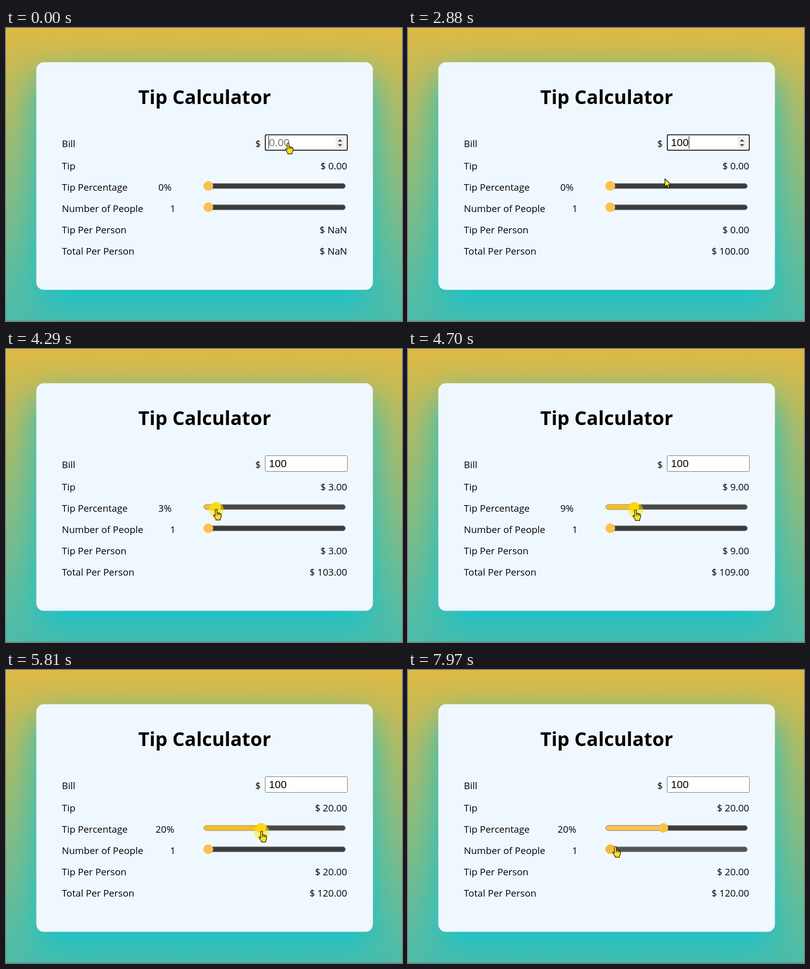
These frames come from a looping animation (780 px wide and 578 px high, 8000 ms). An HTML page with a canvas:

```html
<!DOCTYPE html>
<html lang="en">
<head>
<meta charset="utf-8">
<title>Tip Calculator</title>
<style>
html, body { margin: 0; width: 100%; height: 100%; overflow: hidden; background: #4cbcaa; }
canvas { display: block; }
</style>
</head>
<body>
<canvas id="stage" width="780" height="578"></canvas>
<script>
const g = document.getElementById('stage').getContext('2d');
const LOOP = 8000;
const UI = '"Open Sans", "Noto Sans", sans-serif';
const FIELD = '20.8px "Liberation Sans", Arial, sans-serif';
const TRACK = { x: 389.5, w: 279, thumb: 398.5, unit: 5.22 };
const BLINKS = [1060, 1610, 2140, 2670, 3200];

// Pointer moves: start ms, ms per step, steps, end x, end y
const MOVES = [
  [1940, 70, 1, 552, 218],
  [2140, 100, 3, 565, 241],
  [2740, 70, 2, 548, 297],
  [2880, 70, 2, 464, 298],
  [3020, 70, 5, 409, 316],
  [4290, 77, 1, 414, 317],
  [4367, 77, 10, 482.5, 319],
  [5130, 70, 5, 499, 319],
  [5810, 70, 2, 508, 319],
  [6540, 70, 1, 508, 320],
  [7150, 70, 1, 505, 319],
  [7480, 70, 8, 408.5, 349]
];

const HAND = new Path2D('M-2 1Q-2-1 0-1Q2-1 2 1V6.5Q4 5.5 5 7.3Q7 6.5 8 8.3Q10.5 7.8 10.5 10.5V15L8.5 19V21.5H-.5V19.5L-5 13.5Q-6 10.5-3.8 11L-2 12.8Z');
const KNUCKLES = new Path2D('M2 6.5V11M5 7.5V11M8 8.5V11.5');
const ARROW = new Path2D('M0 0V16L4 12.5L6.5 18L9 17L6.8 11.5H12Z');

function pointerAt(t) {
  let x = 555.5, y = 228;
  for (const [start, gap, steps, tx, ty] of MOVES) {
    if (t < start) break;
    const k = Math.min(steps, Math.floor((t - start) / gap) + 1) / steps;
    x += (tx - x) * k;
    y += (ty - y) * k;
  }
  return { x, y };
}

function text(str, x, y, align = 'left', font = `18.8px ${UI}`, color = '#000') {
  g.font = font;
  g.textAlign = align;
  g.fillStyle = color;
  g.fillText(str, x, y);
}

function box(x, y, w, h, r, fill, stroke, line = 1) {
  g.beginPath();
  g.roundRect(x, y, w, h, r);
  if (fill) { g.fillStyle = fill; g.fill(); }
  if (stroke) { g.strokeStyle = stroke; g.lineWidth = line; g.stroke(); }
}

function disc(x, y, r, color) {
  g.beginPath();
  g.arc(x, y, r, 0, Math.PI * 2);
  g.fillStyle = color;
  g.fill();
}

function triangle(x, y, dir) {
  g.beginPath();
  g.moveTo(x - 4.5, y);
  g.lineTo(x + 4.5, y);
  g.lineTo(x, y - 5 * dir);
  g.fillStyle = '#505050';
  g.fill();
}

function backdrop() {
  const sky = g.createLinearGradient(0, 0, 0, 578);
  sky.addColorStop(0, '#ddba45');
  sky.addColorStop(1, '#4cbcaa');
  g.fillStyle = sky;
  g.fillRect(0, 0, 780, 578);
  g.save();
  g.shadowColor = '#12c3cf';
  g.shadowBlur = 70;
  g.shadowOffsetY = 30;
  box(59.7, 67.6, 663, 449, 15, '#f0f8ff');
  g.restore();
  g.fillStyle = 'rgba(60,80,80,.35)';
  g.fillRect(0, 577, 780, 1);
}

function billField(bill, focused, caret) {
  if (focused) box(510.8, 210.7, 161.4, 30.5, 2, '#fff', '#101010', 1.8);
  else box(510.5, 210.5, 162, 31, 2, '#fff', '#767676');
  text(bill || '0.00', 518, 233, 'left', FIELD, bill ? '#000' : '#757575');
  if (!focused) return;
  box(649, 214, 18, 24, 0, '#f0f0f0');
  triangle(658, 224, 1);
  triangle(658, 229, -1);
  if (caret) {
    g.fillStyle = '#000';
    g.fillRect(bill ? Math.round(518.3 + bill.length * 11.57) : 517, 213, 1, 25);
  }
}

function slider(y, value, hover, held) {
  const { x, w, thumb, unit } = TRACK;
  const tx = thumb + value * unit;
  const top = y - 4.7;
  box(x, top, w, 10, 5, hover ? (held ? '#4a4747' : '#545454') : '#3b3b3b');
  if (value) {
    g.save();
    g.clip();
    g.fillStyle = held ? '#f6be20' : '#fdc04c';
    g.fillRect(x, top, tx - x, 10);
    g.restore();
  }
  box(x, top, w, 10, 5, null, hover ? '#999' : '#858585');
  disc(tx, y, 9.6, hover && !held ? '#f4b944' : '#fbc14e');
}

function pointer(x, y, hand) {
  g.save();
  g.translate(x, y);
  if (hand) g.scale(0.95, 0.95);
  g.lineJoin = 'round';
  g.lineWidth = 1.2;
  g.strokeStyle = '#111';
  g.fillStyle = hand ? '#ffe01c' : '#fff21a';
  const shape = hand ? HAND : ARROW;
  g.fill(shape);
  g.stroke(shape);
  if (hand) g.stroke(KNUCKLES);
  g.restore();
}

function draw(t) {
  const { x, y } = pointerAt(t);
  const bill = t < 130 ? '' : t < 330 ? '1' : t < 530 ? '10' : '100';
  const focused = t < 3760;
  const held = t >= 3760 && t < 7220;
  const caret = BLINKS.filter(b => b <= t).length % 2 === 0;
  const dragX = t < 7220 ? x : 505;
  const percent = t < 3830 ? 0 : Math.round((dragX - 399.5) / TRACK.unit);
  const onTip = y >= 302 && y <= 322;
  const onPeople = y > 345;
  const tip = bill * percent / 100;
  const money = n => '$ ' + n.toFixed(2);

  backdrop();
  text('Tip Calculator', 391.2, 150, 'center', `bold 37.8px ${UI}`);
  ['Bill', 'Tip', 'Tip Percentage', 'Number of People', 'Tip Per Person', 'Total Per Person']
    .forEach((label, i) => text(label, 110, i ? 237 + 42 * i : 235));
  text('$', 491, 235);
  billField(bill, focused, caret);
  text(money(tip), 672, 279, 'right');
  text(percent + '%', 313, 321, 'center');
  text('1', 328.7, 363, 'center');
  text(bill ? money(tip) : '$ NaN', 672, 405, 'right');
  text(bill ? money(+bill + tip) : '$ NaN', 672, 447, 'right');
  slider(311.5, percent, onTip, held);
  slider(353.5, 0, onPeople, false);
  if (held) {
    disc(TRACK.thumb + percent * TRACK.unit, 311.5, 9.6, '#fdca20');
    disc(x, y, 15, 'rgba(255,232,0,.5)');
  }
  pointer(x, y, y < 240 || onTip || onPeople);
}

function frame() {
  draw(performance.now() % LOOP);
  requestAnimationFrame(frame);
}
frame();
</script>
</body>
</html>
```
